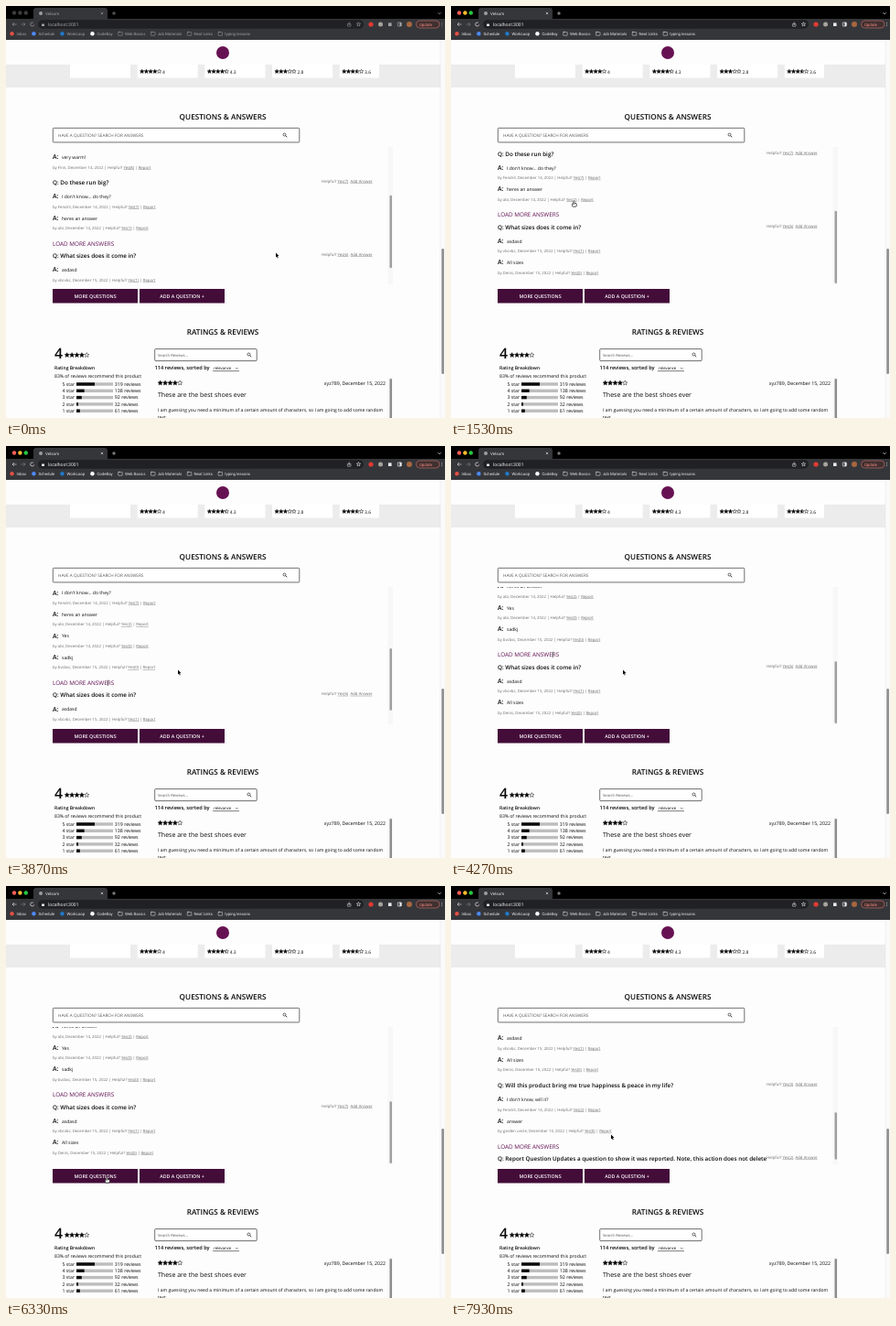
An HTML page with a canvas that plays this animation: 480x450 px, repeating every 8 s.

```html
<!DOCTYPE html>
<html lang="en">
<head>
<meta charset="utf-8">
<title>Velsom</title>
<style>
html, body { margin: 0; width: 100%; height: 100%; overflow: hidden; background: #fdfdfd; }
canvas { display: block; width: 480px; height: 450px; }
</style>
</head>
<body>
<canvas id="stage"></canvas>
<script>
const W = 480, H = 450, LOOP = 8000;
const canvas = document.getElementById('stage');
const ctx = canvas.getContext('2d');
const dpr = window.devicePixelRatio || 1;
canvas.width = W * dpr;
canvas.height = H * dpr;

const BODY = '"Open Sans", sans-serif', UI = 'Roboto, sans-serif';
const INK = '#0a0a0a', GRAY = '#6c6c6c', PLUM = '#430c39';
const VIEW = { top: 154, height: 150 };
const ROW = 23.5;

// When each click takes effect.
const CLICK = { focus: 1300, voteAnswer: 1480, loadMore: 2530, voteQuestion: 5400, moreQuestions: 7070 };

const SCROLL = { from: [98.5], moves: [
  { start: 70, end: 650, to: [130] },
  { start: 3670, end: 4250, to: [177] },
  { start: 7450, end: 7900, to: [267.5] }
] };
const POINTER = { from: [295, 269.5], moves: [
  { start: 350, end: 1200, to: [134, 213], link: true },
  { start: 1700, end: 2300, to: [112.5, 228.5] },
  { start: 3330, end: 3530, to: [188, 244.5] },
  { start: 4500, end: 5000, to: [367, 239], link: true },
  { start: 5450, end: 6300, to: [110, 318], link: true },
  { start: 6930, end: 7300, to: [175, 271.5] }
] };

const linear = u => u;
const smooth = u => u * u * (3 - 2 * u);

function follow({ from, moves }, t, ease) {
  return moves.reduce((pos, { start, end, to }) => {
    const u = ease(Math.min(1, Math.max(0, (t - start) / (end - start))));
    return pos.map((v, i) => v + (to[i] - v) * u);
  }, from);
}

function rect(x, y, w, h, color) {
  ctx.fillStyle = color;
  ctx.fillRect(x, y, w, h);
}

function pill(x, y, w, h, r, fill, stroke, line = 0.7) {
  ctx.beginPath();
  ctx.roundRect(x, y, w, h, r);
  if (fill) { ctx.fillStyle = fill; ctx.fill(); }
  if (stroke) { ctx.strokeStyle = stroke; ctx.lineWidth = line; ctx.stroke(); }
}

function dot(x, y, r, color) {
  ctx.beginPath();
  ctx.arc(x, y, r, 0, Math.PI * 2);
  ctx.fillStyle = color;
  ctx.fill();
}

function ring(x, y, r, color, from = 0, to = Math.PI * 2) {
  ctx.beginPath();
  ctx.arc(x, y, r, from, to);
  ctx.strokeStyle = color;
  ctx.lineWidth = 0.7;
  ctx.stroke();
}

function line(x1, y1, x2, y2, color, width = 0.6) {
  ctx.beginPath();
  ctx.moveTo(x1, y1);
  ctx.lineTo(x2, y2);
  ctx.strokeStyle = color;
  ctx.lineWidth = width;
  ctx.stroke();
}

// An arrowhead with its tip at (x, y); (dx, dy) points back from the tip.
function chevron(x, y, dx, dy, color) {
  line(x, y, x + dx + dy, y + dy + dx, color);
  line(x, y, x + dx - dy, y + dy - dx, color);
}

// Draws text centred vertically on y and returns its width.
function text(s, x, y, size, { color = INK, weight = 400, align = 'left', font = BODY, underline = false } = {}) {
  ctx.font = `${weight} ${size}px ${font}`;
  ctx.textAlign = align;
  ctx.fillStyle = color;
  const base = y + size * 0.35, w = ctx.measureText(s).width;
  ctx.fillText(s, x, base);
  if (underline) rect(x, base + 0.5, w, 0.4, color);
  return w;
}

// Draws styled pieces of text one after another.
function run(pieces, x, y, size, color) {
  for (const [s, underline] of pieces) x += text(s, x, y, size, { color, underline });
}

function starPath(x, y, r) {
  ctx.beginPath();
  for (let i = 0; i < 10; i++) {
    const a = -Math.PI / 2 + i * Math.PI / 5, q = i % 2 ? r * 0.45 : r;
    ctx.lineTo(x + q * Math.cos(a), y + q * Math.sin(a));
  }
  ctx.closePath();
}

function stars(x, y, score, step) {
  const r = step / 2;
  for (let i = 0; i < 5; i++) {
    const cx = x + i * step, part = Math.min(1, Math.max(0, score - i));
    starPath(cx, y, r);
    ctx.strokeStyle = '#111';
    ctx.lineWidth = 0.5;
    ctx.stroke();
    ctx.save();
    ctx.clip();
    rect(cx - r, y - r, 2 * r * part, 2 * r, '#000');
    ctx.restore();
  }
}

function magnifier(x, y) {
  ring(x - 0.5, y - 0.5, 1.5, '#222');
  line(x + 0.6, y + 0.6, x + 2.2, y + 2.2, '#222', 0.9);
}

function heading(s, y) {
  text(s, 237, y, 8.2, { weight: 600, align: 'center' });
}

function tabBar(focused, ink) {
  rect(0, 0, W, 14, '#000');
  rect(0, 14, W, 23, '#35363a');
  ['#fe5f57', '#febc2e', '#28c840'].forEach((c, i) => dot(9 + i * 6.4, 7.5, 2.2, focused ? c : '#3b3c3e'));
  pill(30, 2, 81, 14, 3, '#35363a');
  dot(38, 8, 2, '#9a9da1');
  text('Velsom', 43, 8, 4.5, { color: ink, font: UI });
  line(103.8, 6.8, 106.2, 9.2, ink);
  line(106.2, 6.8, 103.8, 9.2, ink);
  line(116, 8, 120, 8, ink);
  line(118, 6, 118, 10, ink);
  chevron(474, 9, 0, -1.8, ink);
}

function toolbar(ink) {
  const y = 20;
  line(7, y, 11.5, y, ink);
  chevron(7, y, 2, 0, ink);
  line(16.5, y, 21, y, '#85878b');
  chevron(21, y, -2, 0, '#85878b');
  ring(28.7, y, 2, ink, 0.2, 5.3);
  pill(35, 15.3, 356, 9.4, 4.7, '#202124');
  pill(39, 19.5, 3, 2.6, 0.4, ink);
  text('localhost:3001', 46, y, 5.1, { color: ink, font: UI });

  pill(373.4, 19.4, 3.6, 2.8, 0.2, null, ink, 0.5);
  line(375.2, 21, 375.2, 17.5, ink);
  starPath(385.5, y, 2.3);
  ctx.stroke();
  dot(399, y, 2.6, '#e23a35');
  dot(409.5, y, 2.5, '#a7a39c');
  rect(418, 18.4, 3.6, 3.6, ink);
  pill(428.3, 18, 4, 4, 0.5, null, ink);
  rect(430.4, 18, 1.9, 4, ink);
  dot(441, y, 3, '#a5673f');
  pill(448.5, 16, 25.5, 8, 4, '#40302f', '#e8837a', 0.5);
  text('Update', 452, y, 4.4, { color: '#f28b82', font: UI });
  for (let i = -1; i <= 1; i++) dot(476.6, y + i * 1.8, 0.45, ink);
}

function bookmarks(ink) {
  const y = 30.2;
  const sites = { Inbox: '#e25045', Schedule: '#4b8bf4', WorkLoop: '#1d78c8', CodeBay: '#fff' };
  const folders = ['Web Basics', 'Job Materials', 'Neat Links', 'typing lessons'];
  let x = 6.5;
  for (const name of [...Object.keys(sites), ...folders]) {
    if (sites[name]) dot(x, y, 2.2, sites[name]);
    else {
      pill(x - 2.2, y - 1.6, 4.6, 3.6, 0.4, null, ink, 0.5);
      line(x - 2.2, y - 1.9, x - 0.3, y - 1.9, ink);
    }
    x += 13.3 + text(name, x + 5, y, 4.35, { color: ink, font: UI });
  }
}

function header() {
  rect(0, 37, W, 413, '#fdfdfd');
  rect(0, 64, 475, 25, '#ececec');
  dot(237, 51, 7, '#661252');
  [null, 4, 4.3, 2.8, 3.6].forEach((score, i) => {
    const x = 70 + i * 73.7;
    rect(x, 64, Math.min(66, 408 - x), 14.5, '#fff');
    if (!score) return;
    stars(x + 5, 71.5, score, 4.7);
    text(String(score), x + 27.3, 72, 4.9);
  });
  rect(475, 37, 5, 413, '#fafafa');
  rect(474.8, 37, 0.4, 413, '#e2e2e2');
  pill(476.3, 265, 2.6, 137, 1.3, '#8c8c8c');
}

function ratings() {
  heading('RATINGS & REVIEWS', 356);
  text('4', 53, 379, 15.8, { weight: 600 });
  stars(66.7, 381.3, 4, 5.4);
  text('Rating Breakdown', 53, 395, 5.03, { weight: 600 });
  text('83% of reviews recommend this product', 53, 404, 5.08);
  [319, 138, 92, 32, 61].forEach((count, i, all) => {
    const y = 413 + i * 7.3;
    text(`${5 - i} star`, 75, y, 5.2, { align: 'right' });
    rect(77, y - 1.7, 40, 3.4, '#bdbdbd');
    rect(77, y - 1.7, 20 * count / all[0], 3.4, '#0b0b0b');
    text(`${count} reviews`, 118.7, y, 5.3);
  });
}

function reviews() {
  pill(162.7, 374.6, 111.5, 13, 1, '#fff', '#333');
  text('Search Reviews...', 166, 381.2, 4.2, { color: '#555' });
  magnifier(266, 381);
  text('114 reviews, sorted by', 162.5, 395, 5.65, { weight: 600 });
  text('relevance', 227, 395.4, 4.3);
  line(226, 398.7, 255, 398.7, '#222');
  chevron(252.3, 396.4, 0, -1.3, '#222');

  stars(168.7, 411.8, 4, 5.4);
  text('xyz789, December 15, 2022', 415, 412.5, 5.27, { align: 'right' });
  text('These are the best shoes ever', 166, 424.7, 7);
  text('I am guessing you need a minimum of a certain amount of characters, so I am going to add some random', 166, 441.5, 5.03);
  text('text', 166, 449, 5.03);
  rect(417.5, 406, 5.5, 44, '#f7f7f7');
  pill(419.5, 407, 2.5, 60, 1.2, '#8d8d8d');
}

function answer({ body, by, day, votes }, y) {
  text('A:', 51, y, 6.9, { weight: 600 });
  text(body, 61, y + 0.3, 5.06);
  run([[`by ${by}, December ${day}, 2022 | Helpful? `], [`Yes(${votes})`, true], [' | '], ['Report', true]],
    51, y + 11.2, 4.3, GRAY);
}

// Draws one question with its answers and returns where the next one begins.
function question({ title, votes, answers = [], more, caret }, y) {
  text('Q: ' + title, 51, y, 6.3, { weight: 600 });
  run([['Helpful? '], [`Yes(${votes})`, true]], 345, y - 1.5, 4.32, GRAY);
  text('Add Answer', 376.5, y - 1.5, 4.32, { color: GRAY, underline: true });
  answers.forEach((a, i) => answer(a, y + 15 + i * ROW));
  const end = y + 15 + answers.length * ROW;
  if (!more) return end + 5;
  text('LOAD MORE ANSWERS', 51, end + 4.5, 6.35, { color: '#5f0f50' });
  if (caret) rect(110.9, end + 1.2, 0.6, 6.6, '#222');
  return end + 18;
}

function questionList(t) {
  const expanded = t >= CLICK.loadMore;
  const list = [
    {
      title: 'Do these run big?', votes: 7, more: true, caret: expanded && t < CLICK.voteQuestion,
      answers: [
        { body: "I don't know... do they?", by: 'Fendril', day: 14, votes: 7 },
        { body: 'heres an answer', by: 'abi', day: 14, votes: t < CLICK.voteAnswer ? 1 : 2 },
        { body: 'Yes', by: 'abi', day: 14, votes: 0 },
        { body: 'sadkj', by: 'bvcbvc', day: 15, votes: 0 }
      ].slice(0, expanded ? 4 : 2)
    },
    {
      title: 'What sizes does it come in?', votes: t < CLICK.voteQuestion ? 6 : 7,
      answers: [
        { body: 'asdasd', by: 'vbcvbc', day: 15, votes: 1 },
        { body: 'All sizes', by: 'Denis', day: 15, votes: 0 }
      ]
    },
    {
      title: 'Will this product bring me true happiness & peace in my life?', votes: 3, more: true,
      answers: [
        { body: "I don't know, will it?", by: 'Fendril', day: 14, votes: 2 },
        { body: 'answer', by: 'garden uncle', day: 15, votes: 0 }
      ]
    },
    { title: 'Report Question Updates a question to show it was reported. Note, this action does not delete', votes: 2 }
  ];
  return list.slice(0, t < CLICK.moreQuestions ? 2 : 4);
}

function questions(t) {
  heading('QUESTIONS & ANSWERS', 121);
  pill(51.3, 133.3, 269.5, 15.6, 1, '#fff', '#333');
  text('HAVE A QUESTION? SEARCH FOR ANSWERS', 57, 141, 4.68, { color: '#555' });
  magnifier(305, 141);

  const [scroll] = follow(SCROLL, t, linear);
  const top = 291.5 - scroll;
  const total = 280 + (t >= CLICK.loadMore ? 2 * ROW : 0) + (t >= CLICK.moreQuestions ? 103 : 0);
  const ratio = VIEW.height / total;

  ctx.save();
  ctx.beginPath();
  ctx.rect(45, VIEW.top, 385, VIEW.height);
  ctx.clip();
  answer({ body: 'very warm!', by: 'Finn', day: 14, votes: 8 }, top - 28);
  questionList(t).reduce((y, q) => question(q, y), top);
  rect(417.5, VIEW.top, 5.5, VIEW.height, '#f7f7f7');
  pill(419.5, VIEW.top + scroll * ratio, 2.5, VIEW.height * ratio - 1, 1.2, '#a0a0a0');
  ctx.restore();

  ['MORE QUESTIONS', 'ADD A QUESTION +'].forEach((label, i) => {
    const x = 51 + i * 95;
    rect(x, 309, 93, 15.5, PLUM);
    text(label, x + 46.5, 316.7, 5.25, { color: '#fff', weight: 600, align: 'center' });
  });
}

function pointer(t) {
  const [x, y] = follow(POINTER, t, smooth);
  const last = POINTER.moves.filter(m => t >= m.start).pop();
  const hand = last && last.link && t >= last.end;
  ctx.save();
  ctx.translate(x, y);
  if (hand) {
    pill(-1.6, 2.4, 5, 3.8, 1.4, '#fff', '#111');
    pill(-0.5, -0.2, 1.4, 4, 0.7, '#fff', '#111', 0.5);
  } else {
    const outline = new Path2D('M0 0V5L1.1 4L1.9 5.9L2.7 5.5L1.9 3.7L3.5 3.6Z');
    ctx.strokeStyle = '#fff';
    ctx.lineWidth = 0.8;
    ctx.stroke(outline);
    ctx.fillStyle = '#000';
    ctx.fill(outline);
  }
  ctx.restore();
}

let start;
function frame(now) {
  start ??= now;
  const t = (now - start) % LOOP;
  const focused = t >= CLICK.focus;
  const ink = focused ? '#e8e9eb' : '#a0a1a4';
  ctx.setTransform(dpr, 0, 0, dpr, 0, 0);
  ctx.textRendering = 'geometricPrecision';
  tabBar(focused, ink);
  toolbar(ink);
  bookmarks(ink);
  header();
  questions(t);
  ratings();
  reviews();
  pointer(t);
  requestAnimationFrame(frame);
}
requestAnimationFrame(frame);
</script>
</body>
</html>
```
